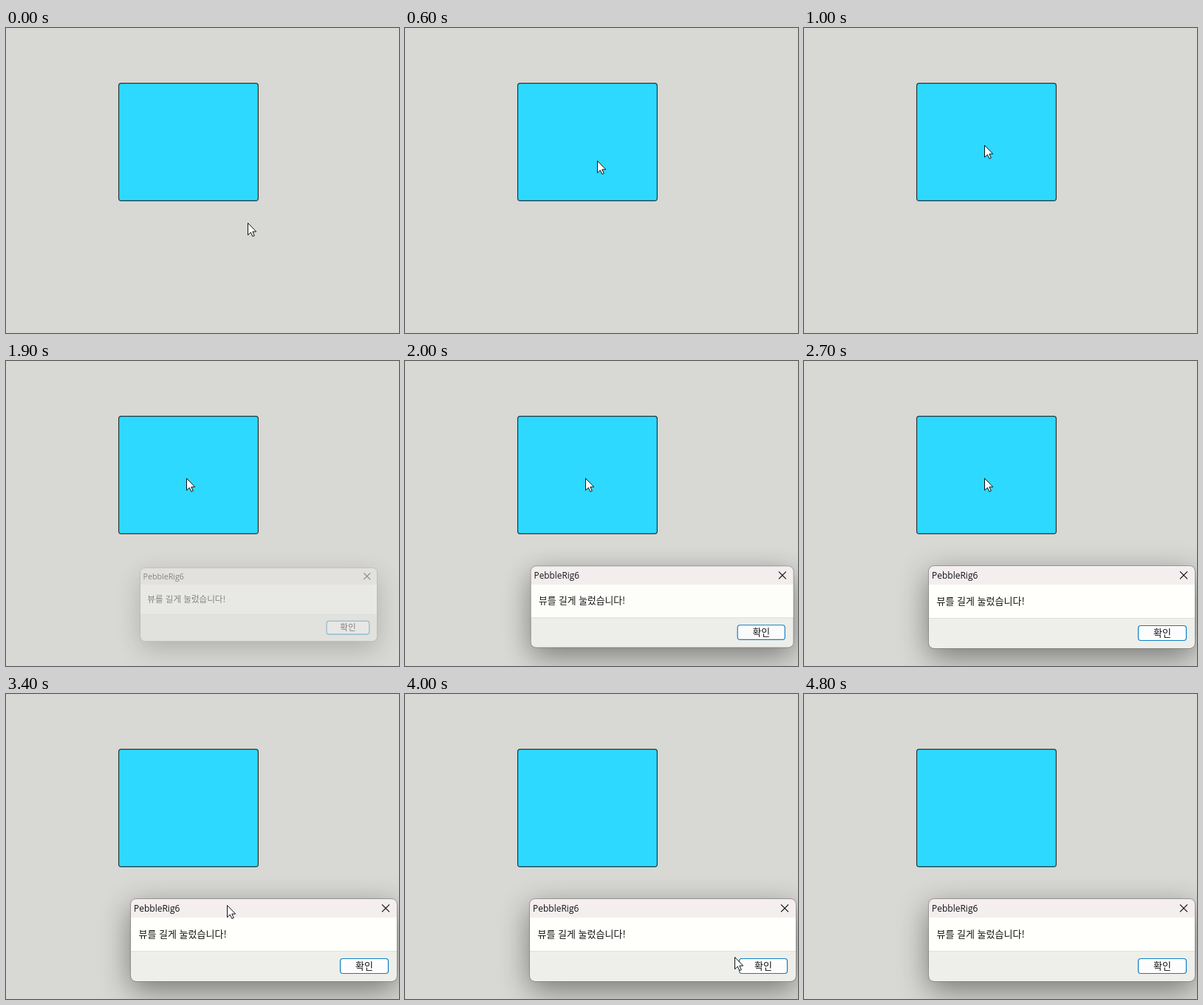
Recreate the animation shown at these times as an HTML page. Size 532 by 412 pixels, loop 5000 ms.

```html
<!DOCTYPE html>
<html lang="ko">
<head>
<meta charset="utf-8">
<style>
  html, body { margin: 0; width: 100%; height: 100%; overflow: hidden; background: #d8d8d4; }
  svg { display: block; }
  text { fill: #111; font: 13px "Noto Sans CJK KR", "Noto Sans CJK", sans-serif; }
  .title { font: 12px "Open Sans", "Noto Sans", sans-serif; }
  .shadow { filter: drop-shadow(0 12px 20px rgba(0, 0, 0, .45)); }
</style>
</head>
<body>
<svg width="532" height="412" viewBox="0 0 532 412">
  <rect x="152.6" y="74.6" width="188.8" height="158.8" rx="3.5" fill="#2dd9ff" stroke="#2b3437" stroke-width="1.2"/>
  <g id="dialog">
    <rect class="shadow" x="169" y="277" width="360" height="111" rx="7" fill="#eeefea"/>
    <path d="M169 302v-18a7 7 0 0 1 7-7h346a7 7 0 0 1 7 7v18z" fill="#f4eeef"/>
    <path d="M169 302h360v45h-360z" fill="#fffffb"/>
    <path d="M169 347.5h360" stroke="#dfdfdb"/>
    <rect x="168.5" y="276.5" width="361" height="112" rx="7.5" fill="none" stroke="#777" stroke-opacity=".6"/>
    <text class="title" x="173" y="294">PebbleRig6</text>
    <path d="M509 284.3l10 10m0-10l-10 10" stroke="#111" stroke-width="1.2"/>
    <text x="179.5" y="328.5">뷰를 길게 눌렀습니다!</text>
    <rect x="452.5" y="357.5" width="65" height="20" rx="3.5" fill="#fdfdfd" stroke="#0f7fc4" stroke-width="1.2"/>
    <text x="485" y="371.5" text-anchor="middle">확인</text>
  </g>
  <path id="cursor" d="M.5 .5v16.2l3.8-3.6 2.6 5.4 2.4-1.1-2.5-5.3h4.9z" fill="#fff" stroke="#111"/>
</svg>
<script>
const LOOP = 5000, STEP = 100, POP = 1900, EXIT = 4300;
const dialog = document.getElementById("dialog");
const cursor = document.getElementById("cursor");

const home = { x: 327, y: 263 };
const glides = [
  { start: 500, end: 800, dx: -83, dy: -105 },
  { start: 2700, end: 3400, dx: 55, dy: 127 },
  { start: 3700, end: 4200, dx: 151, dy: 72 }
];

// 0 before start, 1 after end, slowing down in between
function ease(t, { start, end }) {
  const u = Math.min(1, Math.max(0, (t - start) / (end - start)));
  return 1 - (1 - u) ** 4;
}

function draw(now) {
  const t = Math.floor(now % LOOP / STEP) * STEP;

  let { x, y } = home;
  for (const g of glides) {
    x += g.dx * ease(t, g);
    y += g.dy * ease(t, g);
  }
  cursor.setAttribute("transform", `translate(${Math.round(x)} ${Math.round(y)})`);
  cursor.setAttribute("visibility", t < EXIT ? "visible" : "hidden");

  // The dialog closes most of the remaining gap on every step
  const n = (t - POP) / STEP;
  const scale = 1 - .111 * .125 ** n;
  dialog.setAttribute("visibility", n < 0 ? "hidden" : "visible");
  dialog.setAttribute("transform", `translate(286 302) scale(${scale}) translate(-286 -302)`);
  dialog.setAttribute("opacity", 1 - .58 * .05 ** n);
}

const start = performance.now();
function tick() {
  draw(performance.now() - start);
  requestAnimationFrame(tick);
}
tick();
</script>
</body>
</html>
```
